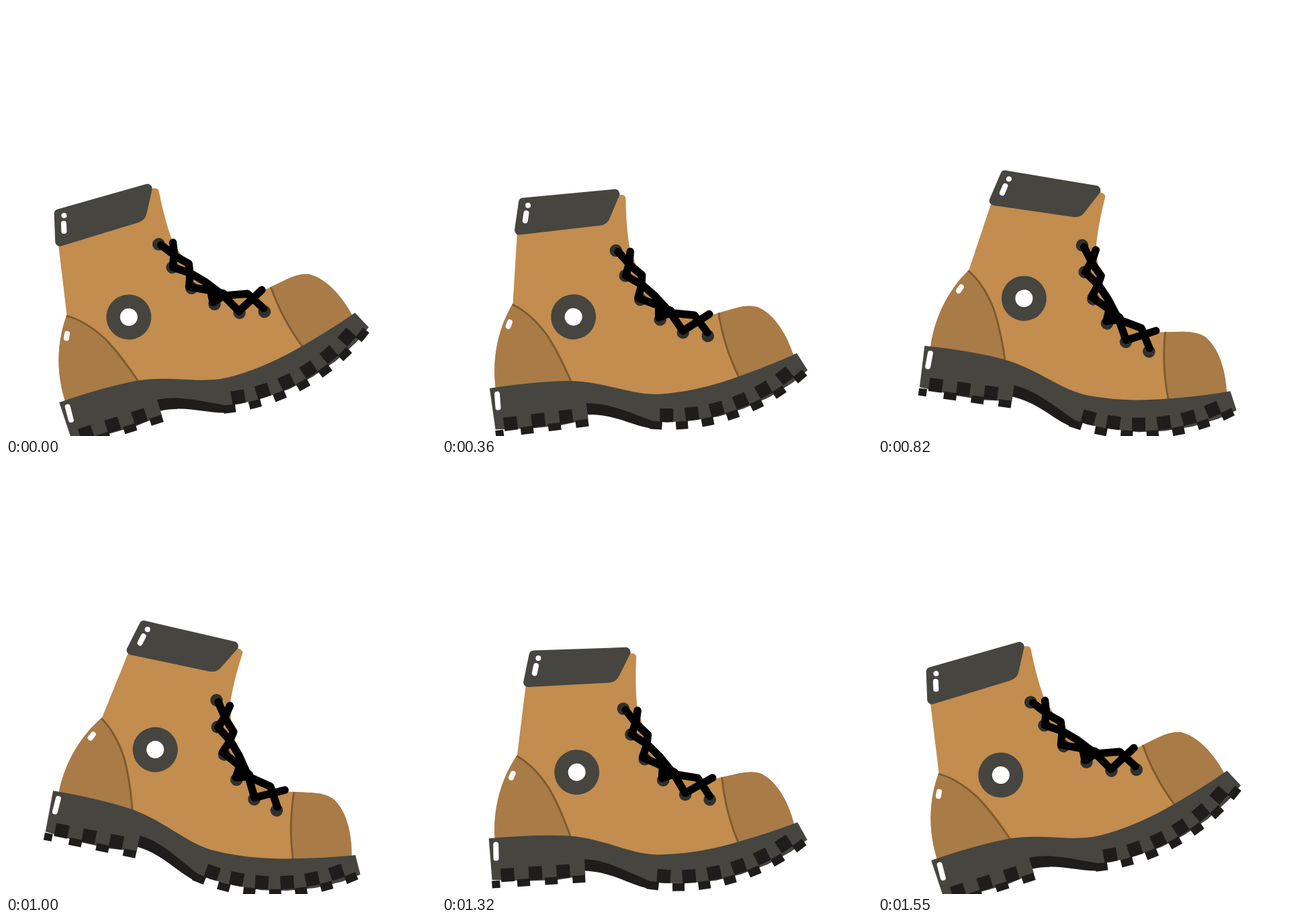
Animation of 640x640 px, one loop 1.6 s. Source, as an HTML page:

```html
<!DOCTYPE html>
<html lang="en">
<head>
<meta charset="utf-8">
<title>Rocking boot</title>
<style>
  html, body { margin: 0; width: 100%; height: 100%; overflow: hidden; background: #fff; }
  svg { display: block; width: 100vw; height: 100vh; }
  .tan { fill: #c28d4e; }
  .patch { fill: #a97b47; }
  .gray { fill: #464540; }
  .black { fill: #1e1d1b; }
  .seam { fill: none; stroke: #7e5a2e; stroke-width: 2.8; stroke-linecap: round; }
  .shine { fill: none; stroke: #fff; stroke-width: 8; stroke-linecap: round; }
  .lace { fill: none; stroke: #000; stroke-width: 11.5; stroke-linecap: round; stroke-linejoin: round; }
</style>
</head>
<body>
<svg viewBox="0 0 640 640">
  <g id="boot">
    <path class="tan" d="M141 305L119 422C90 459 77 505 78 546L190 560L300 590H400L525 560
      C519 520 504 487 481 473Q468 467 447 470L415 475L385 477L350 467L328 440L312 405
      L302 363Q300 335 305 288Q306 282 297 281Z"/>
    <path class="patch" d="M119 422C90 459 77 505 78 548L190 549C181 500 160 450 119 422Z"/>
    <path class="patch" d="M421 474L447 470Q468 467 481 473C504 487 519 520 525 556L440 577Q424 525 421 474Z"/>
    <path class="seam" d="M119 424C138 436 152 455 163 474Q178 505 190 546M421 475Q423 526 439 572"/>
    <path class="black" d="M207 580L320 606L303 633C270 624 250 604 207 600Z"/>
    <path class="gray" d="M69 543Q140 541 190 547C245 556 275 579 318 583Q370 586 428 574Q485 562 529 548
      L542 575L517 591L480 608L440 620L402 627L362 628L324 626L305 622
      C262 600 240 586 209 583V607L167 611L125 610L70 605Z"/>
    <g id="treads" class="black"></g>
    <path class="gray" stroke="#464540" stroke-width="14" stroke-linejoin="round"
      d="M153 275L290 279L272 310Q269 316 262 316L142 315Z"/>
    <circle class="gray" cx="206" cy="453" r="33.5"/>
    <circle fill="#fff" cx="206" cy="453" r="13"/>
    <circle fill="#fff" cx="159.5" cy="280" r="4"/>
    <path class="shine" d="M155.5 291L152.5 302M111 449L108 455M79 553L78 573"/>
    <g id="eyelets" fill="#30302e"></g>
    <path class="lace" d="M284 365L300 388L315 404L312 420L305 437L330 450L351 462
      M302 367L299 382L291 402L314 419L330 437L334 452L332 470L350 465L385 473L401 501
      M330 437L350 465L365 494L407 474"/>
  </g>
</svg>
<script>
  const find = id => document.getElementById(id);
  const repeat = (count, make) => Array.from({ length: count }, (_, k) => make(k)).join('');

  const block = (x, y, w, h, turn = 0) =>
    `<rect x="${x - w / 2}" y="${y - h / 2}" width="${w}" height="${h}" transform="rotate(${-turn} 363 334)"/>`;

  // Straight row under the heel, then an arc of radius 300 under the toe.
  find('treads').innerHTML =
    repeat(3, k => block(93.5 + 41.5 * k, 599, 20, 20)) +
    repeat(4, k => block(75.5 + 41.2 * k, 612, k ? 19 : 12, 11)) +
    repeat(6, k => block(363, 618, 20, 20, -7.6 + 7.6 * k)) +
    repeat(7, k => block(363, 633.5, 18, 12, -10.6 + 7.4 * k));

  const bezier = (a, b, c, d, t) =>
    a * (1 - t) ** 3 + 3 * b * t * (1 - t) ** 2 + 3 * c * t * t * (1 - t) + d * t ** 3;
  find('eyelets').innerHTML = repeat(6, k =>
    `<circle cx="${bezier(281, 288, 338, 401, k / 5)}" cy="${bezier(363, 426, 504, 506, k / 5)}" r="9.3"/>`);

  const LOOP = 1600, LAST = 34, PEAK = 21, LOW = -17.5, SWING = 30;

  function draw(now) {
    // 22 poses per second, on a 10 ms clock.
    const time = Math.floor(now % LOOP / 10) * 10 + 5;
    const step = Math.min(LAST, Math.floor(time * 22 / 1000));
    const lift = step < PEAK
      ? (step / PEAK) ** 1.1
      : 1 - ((step - PEAK) / (LAST - PEAK)) ** 1.28;
    const tilt = LOW + SWING * lift;
    // The sole rolls on its curve, so the ring's centre follows the tilt.
    const x = 206 + 1.48 * tilt - 0.0005 * tilt ** 3;
    const y = 453 - 1.824 * tilt - 0.062 * tilt ** 2 + 0.00055 * tilt ** 3;
    find('boot').setAttribute('transform', `translate(${x} ${y}) rotate(${tilt}) translate(-206 -453)`);
  }

  const start = performance.now();
  function tick() {
    draw(performance.now() - start);
    requestAnimationFrame(tick);
  }
  tick();
</script>
</body>
</html>
```
